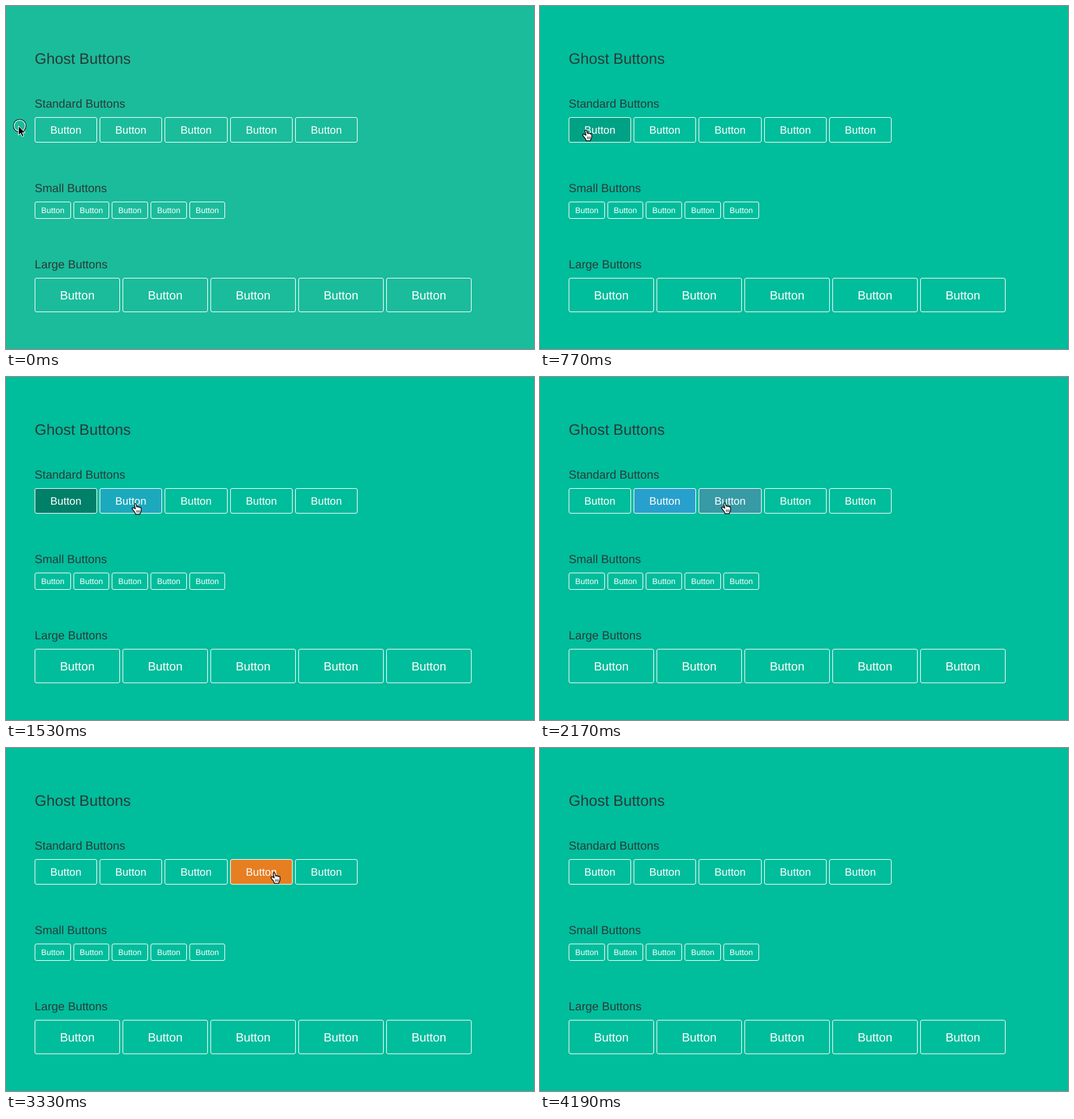
Animation, 829 px wide and 540 px high, one loop 5.23 s. Source, as an HTML page:

```html
<!DOCTYPE html>
<html lang="en">
<head>
<meta charset="utf-8">
<title>Ghost Buttons</title>
<style>
  html, body { margin: 0; width: 100%; height: 100%; overflow: hidden; background: #00bd9c; }
  svg { display: block; width: 829px; height: 540px; }
  text { font-family: "Liberation Sans", Arial, sans-serif; text-rendering: geometricPrecision; }
  .title { fill: #2a3a38; }
  .label { fill: #fff; text-anchor: middle; }
</style>
</head>
<body>
<svg viewBox="0 0 829 540">
  <rect id="back" width="829" height="540"/>
  <text class="title" x="45" y="91" font-size="23.8">Ghost Buttons</text>
  <g id="rows"></g>
  <g id="ring" fill="none">
    <circle cx="21.5" cy="188.5" r="9" stroke="#fff" stroke-width="1.4"/>
    <circle cx="21.5" cy="188.5" r="10" stroke="#111" stroke-width="1.1"/>
  </g>
  <g id="arrow">
    <path d="M.6 1V15.4L3.9 12.3 6.4 17.6 9 16.5 6.6 11.5H11.3Z" stroke="#fff"/>
  </g>
  <g id="hand">
    <g transform="translate(-.7 -.4) scale(1.04)" stroke="#000" stroke-linejoin="round" stroke-linecap="round">
      <path fill="#fff" stroke-width="1.2" d="M5.5 .7C4.3 .7 3.9 1.6 4.2 2.8L5.6 8.6C4.6 7.6 3 6.8 1.7 7C.6 7.4 .6 8.6 1.3 9.4L4.4 13.2C5.1 14 5.6 15 5.8 16.8H12.4C12.6 15.2 14.2 13.4 14.4 11L14.3 7.4C14.2 6 12.8 5.9 12.3 6.8C12 5.4 10.4 5.2 9.8 6.2C9.4 5 8.2 4.8 7.6 5.6L6.8 2C6.6 1.1 6.2 .7 5.5 .7Z"/>
      <path fill="none" stroke-width=".8" d="M7.9 11V14M9.9 11V14M11.9 11V14"/>
    </g>
  </g>
</svg>
<script>
const LOOP = 5230, FADE = 200, STEP = 30;
const LEFT = 45, GAP = 4;
const COLORS = ["#005244", "#3498db", "#9b59b6", "#e67e22", "#e74c3c"];

// Pointer moves: start, duration, end x, end y, moment it crosses a button edge
const MOVES = [
  [590, 310, 97, 199, 742],
  [1350, 210, 209, 199, 1454],
  [2000, 230, 314, 197, 2110],
  [2610, 230, 416, 196, 2733],
  [3330, 290, 494, 195, 3425],
  [3840, 290, 744, 190, 3920]];

// Heading, top, height and width of a button, label size
const ROWS = [
  ["Standard Buttons", 175, 40, 98.2, 16.9],
  ["Small Buttons", 308, 27, 56.65, 12.6],
  ["Large Buttons", 428, 54, 134, 18.9]];

const $ = id => document.getElementById(id);
const show = (el, on) => el.setAttribute("visibility", on ? "visible" : "hidden");

function add(tag, attrs, text = "") {
  const el = document.createElementNS("http://www.w3.org/2000/svg", tag);
  for (const key in attrs) el.setAttribute(key, attrs[key]);
  el.textContent = text;
  return $("rows").appendChild(el);
}

function addButton(x, y, width, height, size, fill) {
  const left = Math.round(x), right = Math.round(x + width);
  const box = add("rect", {
    x: left + .5, y: y + .5, width: right - left - 1, height: height - 1, rx: 2.5,
    fill, "fill-opacity": 0, stroke: "#fff"
  });
  const baseline = Math.round(y + height / 2 + size * .35);
  add("text", { class: "label", x: (left + right) / 2, y: baseline, "font-size": size }, "Button");
  return box;
}

const boxes = ROWS.map(([name, top, height, width, size]) => {
  add("text", { class: "title", x: LEFT, y: top - 15, "font-size": 18.4 }, name);
  return COLORS.map((color, i) =>
    addButton(LEFT + i * (width + GAP), top, width, height, size, color));
})[0];

function smooth(p) {
  p = Math.min(1, Math.max(0, p));
  return p * p * (3 - 2 * p);
}

// Quick start, soft end
const fade = p => smooth(Math.max(0, p) ** .57);

function pointAt(t) {
  let x = 19, y = 188;
  for (const [start, time, endX, endY] of MOVES) {
    const k = smooth((t - start) / time);
    x += (endX - x) * k;
    y += (endY - y) * k;
  }
  return [Math.round(x), Math.round(y)];
}

function draw(time) {
  const t = Math.floor(time / STEP) * STEP + 20 - (time % STEP < 20 ? STEP : 0);
  $("back").setAttribute("fill", time < 770 ? "#1bbc9b" : "#00bd9c");
  show($("ring"), time < 60);

  boxes.forEach((box, i) => {
    const enter = MOVES[i][4], leave = MOVES[i + 1][4] + 16;
    const level = fade((t - enter) / FADE) * (1 - fade((t - leave) / FADE));
    box.setAttribute("fill-opacity", level.toFixed(3));
  });

  const [x, y] = pointAt(t);
  const inside = x > LEFT - 5 && x < 548;
  for (const id of ["arrow", "hand"]) {
    $(id).setAttribute("transform", `translate(${x} ${y})`);
    show($(id), time < 4190 && inside === (id === "hand"));
  }
}

const start = performance.now();
function frame() {
  draw((performance.now() - start) % LOOP);
  requestAnimationFrame(frame);
}
frame();
</script>
</body>
</html>
```
